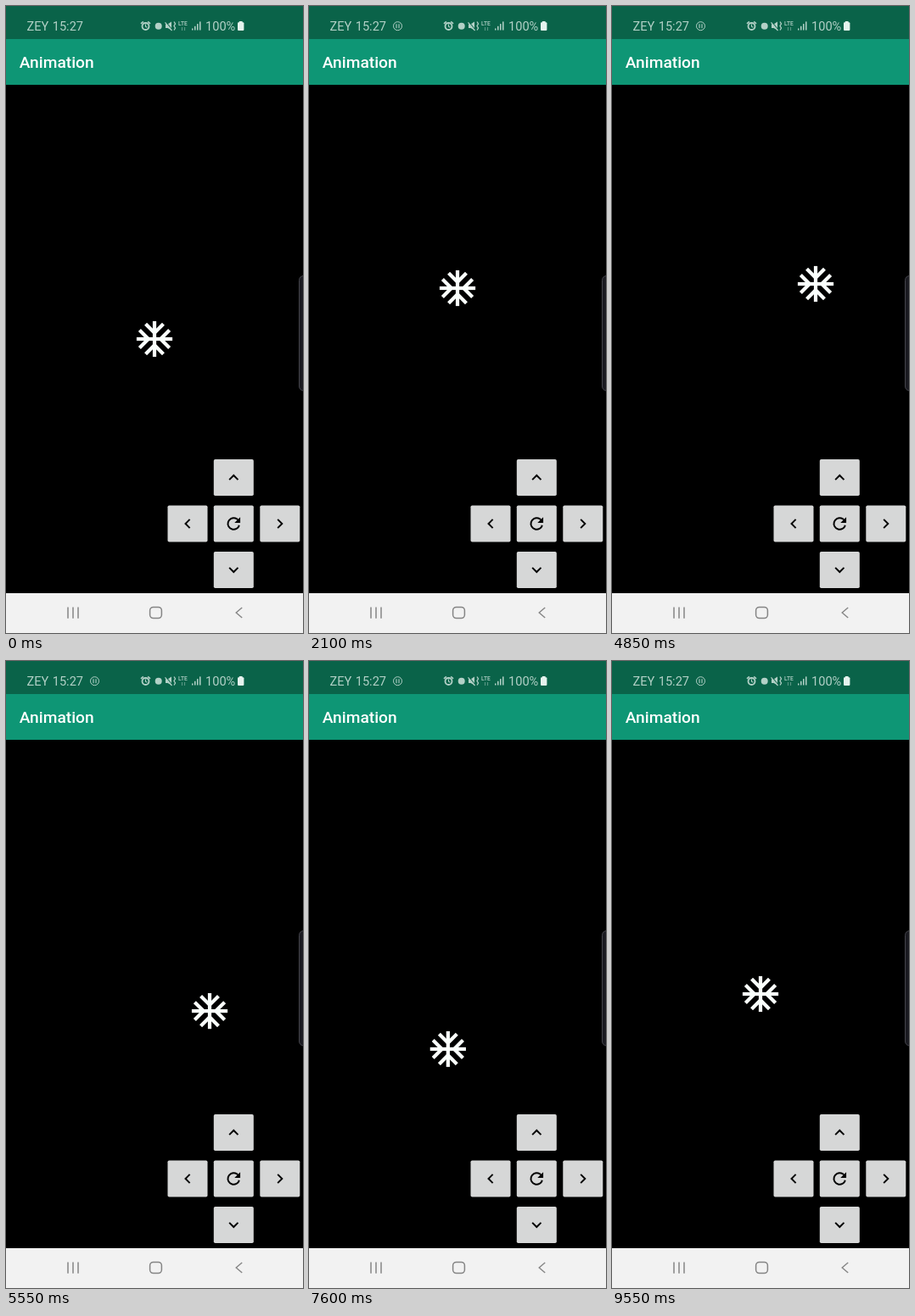
An HTML page with a canvas for the animation above (10000 ms loop, 350 by 740 pixels).

```html
<!DOCTYPE html>
<html lang="en">
<head>
<meta charset="utf-8">
<title>Animation</title>
<style>
  html, body { margin: 0; width: 100%; height: 100%; overflow: hidden; background: #000; }
  canvas { display: block; }
</style>
</head>
<body>
<canvas id="stage" width="350" height="740"></canvas>
<script>
const ctx = document.getElementById('stage').getContext('2d');
const LOOP = 10000, TICK = 50, MOVE = 1000;
const DP = 0.973;
const HOME = { x: 175, y: 393 }, STEP = 65;
const STATUS_INK = '#b3d1c7';

const buttons = {
  up: { x: 268.3, y: 556.5, turn: 0 },
  right: { x: 322.8, y: 611, turn: 1 },
  down: { x: 268.3, y: 665.5, turn: 2 },
  left: { x: 214, y: 611, turn: 3 },
  reset: { x: 268.3, y: 611 }
};

// Each press ripples its button, then moves the flake to an offset from home.
const presses = [
  { button: 'up', touch: 1230, start: 1279, y: -1 },
  { button: 'right', touch: 2850, start: 2936, x: 1 },
  { button: 'down', touch: 4850, start: 4950, y: 1 },
  { button: 'left', touch: 6980, start: 7045, x: -1 },
  { button: 'reset', touch: 8450, start: 8540, x: 0, y: 0 }
];

const clamp = v => Math.min(1, Math.max(0, v));
const ease = v => (1 - Math.cos(Math.PI * clamp(v))) / 2;

function at(x, y, scale, turn, draw) {
  ctx.save();
  ctx.translate(x, y);
  ctx.scale(scale, scale);
  ctx.rotate(turn * Math.PI / 2);
  draw();
  ctx.restore();
}

function rect(x, y, w, h, color) {
  ctx.fillStyle = color;
  ctx.fillRect(x, y, w, h);
}

function line(points, width, color) {
  ctx.beginPath();
  points.forEach(([x, y]) => ctx.lineTo(x, y));
  ctx.lineWidth = width;
  ctx.strokeStyle = color;
  ctx.stroke();
}

function ring(x, y, r, width, color) {
  ctx.beginPath();
  ctx.arc(x, y, r, 0, 2 * Math.PI);
  ctx.lineWidth = width;
  ctx.strokeStyle = color;
  ctx.stroke();
}

function disc(x, y, r, color) {
  ctx.beginPath();
  ctx.arc(x, y, r, 0, 2 * Math.PI);
  ctx.fillStyle = color;
  ctx.fill();
}

function text(str, x, y, font, color) {
  ctx.font = font + ' Roboto, sans-serif';
  ctx.fillStyle = color;
  ctx.fillText(str, x, y);
}

function drawStatusBar(t) {
  const ink = STATUS_INK;
  rect(0, 0, 350, 39, '#0a6349');
  text('ZEY', 24.5, 29, '14.6px', ink);
  text('15:27', 54.7, 29, '14.6px', ink);

  ctx.globalAlpha = clamp((t - 50) / 350);
  ring(104.5, 23.7, 5, 1, ink);
  line([[103, 21.3], [103, 26.2]], 1.1, ink);
  line([[106, 21.3], [106, 26.2]], 1.1, ink);
  ctx.globalAlpha = 1;

  // alarm clock
  ring(164.5, 24, 4, 1.8, ink);
  line([[164.5, 21.5], [164.5, 24.3], [166.3, 25.3]], 1.1, ink);
  line([[159, 20.8], [161.8, 18.3]], 1.6, ink);
  line([[167.2, 18.3], [170, 20.8]], 1.6, ink);

  disc(179.7, 23.8, 4, ink);

  // muted speaker with vibration
  ctx.beginPath();
  [[188, 21.5], [190.5, 21.5], [195, 18.5], [195, 28.5], [190.5, 26], [188, 26]]
    .forEach(p => ctx.lineTo(...p));
  ctx.fillStyle = ink;
  ctx.fill();
  line([[188, 18.5], [196, 28.5]], 1.3, '#0a6349');
  line([[187.5, 19.3], [195.5, 29]], 1.2, ink);
  line([[198, 18.5], [199.5, 21], [198, 23.5], [199.5, 26], [198, 28.5]], 1.3, ink);

  text('LTE', 203, 23, '500 6.6px', ink);
  ctx.globalAlpha = 0.45;
  line([[207.5, 25], [207.5, 29]], 1.2, ink);
  line([[210.5, 25], [210.5, 29]], 1.2, ink);
  ctx.globalAlpha = 1;

  for (let i = 0; i < 4; i++) {
    const h = 2 + i * 2.7;
    rect(219 + i * 3, 28.5 - h, 1.5, h, ink);
  }
  text('100%', 235, 29, '14.6px', ink);
  rect(274.8, 18, 3.8, 2, '#e5f3ee');
  ctx.beginPath();
  ctx.roundRect(273, 19.2, 7.4, 9.8, 1);
  ctx.fillStyle = '#e5f3ee';
  ctx.fill();
}

function drawNavBar() {
  const ink = '#858585';
  rect(0, 693, 350, 47, '#f2f2f2');
  [73, 79, 85].forEach(x => line([[x, 709.5], [x, 722.7]], 1.5, ink));
  ctx.beginPath();
  ctx.roundRect(169.6, 709.4, 13.8, 13.2, 4);
  ctx.lineWidth = 1.5;
  ctx.stroke();
  line([[278.2, 710], [271.2, 716], [278.2, 722]], 1.4, ink);
}

function drawEdgeHandle() {
  ctx.beginPath();
  ctx.roundRect(345.5, 318.5, 12, 135.5, 5);
  ctx.fillStyle = '#1b1b21';
  ctx.fill();
  ctx.lineWidth = 1;
  ctx.strokeStyle = '#44444b';
  ctx.stroke();
}

function drawRefresh() {
  ctx.beginPath();
  ctx.arc(0, 0, 7, 0.28, -0.78);
  ctx.lineWidth = 2;
  ctx.strokeStyle = '#000';
  ctx.stroke();
  ctx.beginPath();
  [[8, -8], [8, -1], [1, -1]].forEach(p => ctx.lineTo(...p));
  ctx.fillStyle = '#000';
  ctx.fill();
}

function drawButton(name, t) {
  const { x, y, turn } = buttons[name];
  const age = t - presses.find(p => p.button === name).touch;
  ctx.save();
  ctx.beginPath();
  ctx.roundRect(x - 23.5, y - 21.5, 47, 43, 1.8);
  ctx.fillStyle = '#d6d7d7';
  ctx.fill();
  if (age > 0 && age < 400) {
    ctx.clip();
    const alpha = 0.1 * clamp(age / 50) * clamp((400 - age) / 250);
    disc(x + 2, y + 4, 14 + 22 * clamp(age / 225), `rgba(0,0,0,${alpha})`);
  }
  ctx.restore();
  if (name === 'reset') at(x, y, DP, 0, drawRefresh);
  else at(x, y, DP, turn, () => line([[-5.3, 2.7], [0, -2.59], [5.3, 2.7]], 2, '#000'));
}

function flakePosition(t) {
  let x = 0, y = 0;
  for (const p of presses) {
    const k = ease((t - p.start) / MOVE);
    if (p.x !== undefined) x += (p.x - x) * k;
    if (p.y !== undefined) y += (p.y - y) * k;
  }
  return { x: HOME.x + x * STEP, y: HOME.y + y * STEP };
}

function drawFlake(t) {
  const { x, y } = flakePosition(t);
  for (let turn = 0; turn < 4; turn++) {
    at(x, y, 2.11, turn, () => {
      line([[0, 1], [0, -10]], 2, '#fafffc');
      line([[-4.95, -8.36], [0, -3.41], [4.95, -8.36]], 2, '#fafffc');
    });
  }
}

function render(now) {
  const t = Math.floor((now % LOOP) / TICK) * TICK;
  rect(0, 0, 350, 740, '#000');
  drawStatusBar(t);
  rect(0, 39, 350, 54, '#0e9675');
  text('Animation', 15.8, 73, '500 19.2px', '#fff');
  Object.keys(buttons).forEach(name => drawButton(name, t));
  drawFlake(t);
  drawEdgeHandle();
  drawNavBar();
}

let origin;
function loop(now) {
  origin ??= now;
  render(Math.max(0, now - origin));
  requestAnimationFrame(loop);
}
render(0);
requestAnimationFrame(loop);
</script>
</body>
</html>
```
